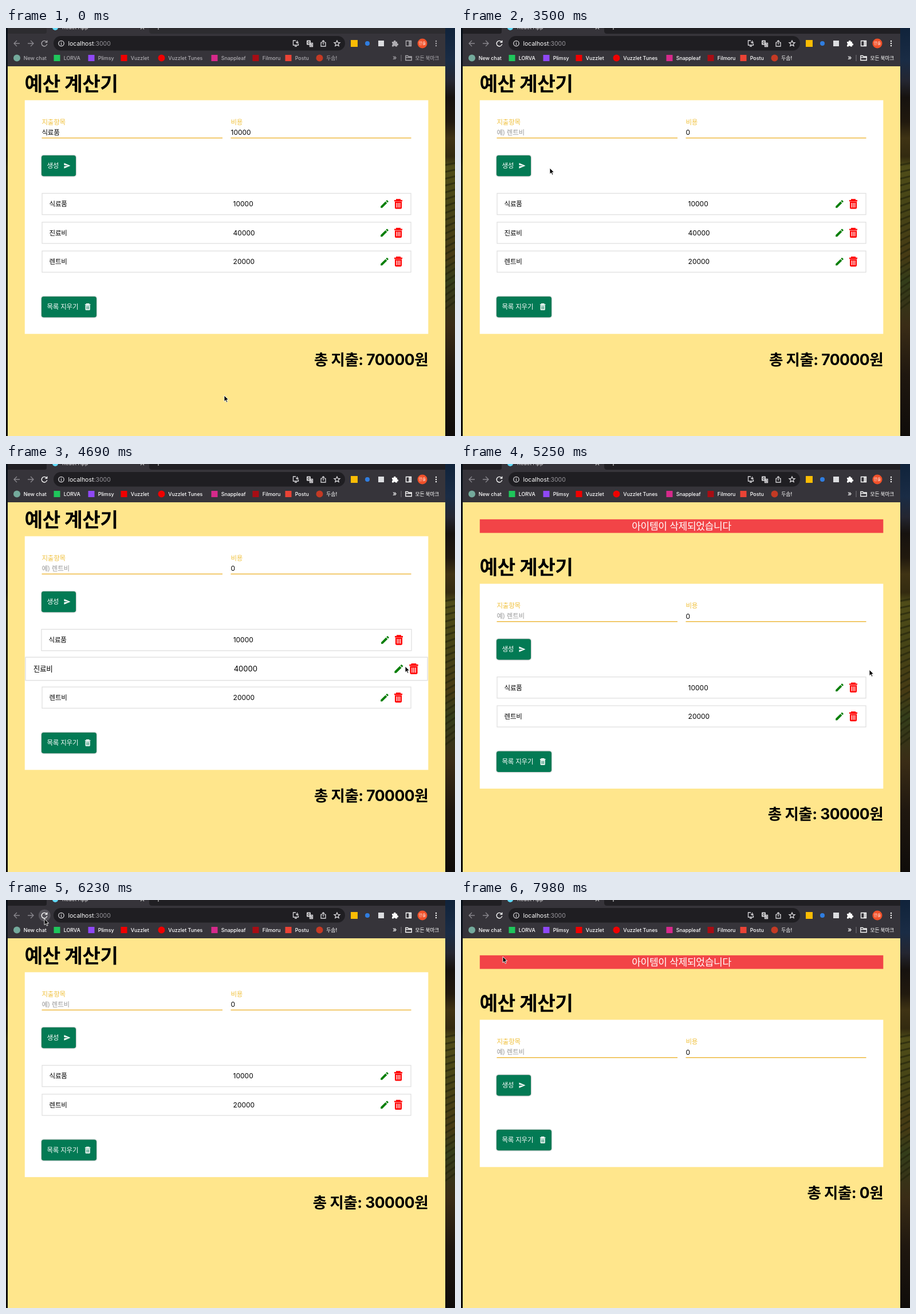
Write an HTML page that moves like this. It is 784 px wide and 714 px high and loops after 8 s.

```html
<!DOCTYPE html>
<html lang="ko">
<head>
<meta charset="utf-8">
<title>예산 계산기</title>
<style>
  html, body { margin: 0; width: 100%; height: 100%; overflow: hidden; background: #111; }
  svg { display: block; width: 784px; height: 714px; font: 12px Inter, "Noto Sans CJK KR", sans-serif; }
  text { white-space: pre; }
  .ko { letter-spacing: -.02em; }
  .bold { font-weight: 700; }
  .label { fill: #f0c03c; }
  .btn { filter: drop-shadow(.75px .75px 1.1px rgba(0, 0, 0, .5)); }
  .btn text, .btn path { fill: #fff; }
  #tabs { fill: #201f23; }
  #tools { color: #fff; font-size: 8.9px; font-weight: 500; }
  #tools text { fill: currentColor; }
  .idle #tabs { fill: #2d2c30; }
  .idle #tools { color: #aeacb1; }
  .line { fill: none; stroke: currentColor; stroke-width: 1.3; }
</style>
</head>
<body>
<svg id="stage" viewBox="0 0 784 714"></svg>
<script>
const LOOP = 8000, STEP = 70, PITCH = 50.4, ALERT_SHIFT = 83.2;
const FOCUSED = 1400, HOVER_TIME = 300;

const states = [
  { since: 0, items: [0, 1, 2], filled: true },
  { since: 1700, items: [0, 1, 2] },
  { since: 5110, items: [0, 2], alert: true },
  { since: 6140, items: [0, 2] },
  { since: 7490, items: [], alert: true },
];
const expenses = [['식료품', 10000], ['진료비', 40000], ['렌트비', 20000]];

// time, x, y of the pointer tip
const path = [
  [0, 381, 643], [70, 375, 630], [280, 195, 300], [490, 42, 27], [630, 76, 56], [840, 76, 56],
  [1050, 86, 35], [1120, 86, 35], [1260, 71, 30], [2240, 71, 30], [2800, 146, 186],
  [3080, 146, 186], [3500, 155, 245], [3600, 200, 289], [3690, 290, 340], [3920, 600, 352],
  [4000, 662, 327], [4150, 686, 313], [4330, 692, 318], [4400, 695, 329], [4415, 695, 339],
  [4690, 697, 354], [4970, 713, 360], [5250, 713, 360], [5810, 67, 33], [6510, 67, 33],
  [6720, 140, 205], [6930, 140, 205], [7300, 125, 430], [7600, 120, 428], [7980, 73, 99],
];

const $ = id => document.getElementById(id);
const within = (t, a, b) => t >= a && t < b;

// Text placed by its left edge and vertical centre
const text = (x, y, str, size = 11.5, attrs = 'class="ko"') =>
  `<text x="${x}" y="${y + size * .365}" font-size="${size}" ${attrs}>${str}</text>`;
const rect = (x, y, w, h, fill, attrs = '') =>
  `<rect x="${x}" y="${y}" width="${w}" height="${h}" fill="${fill}" ${attrs}/>`;
const dot = (x, y, r, fill) => `<circle cx="${x}" cy="${y}" r="${r}" fill="${fill}"/>`;
const icon = (x, y, d) => `<path class="line" transform="translate(${x} ${y})" d="${d}"/>`;
const trash = (x, y, scale, fill, gap) => `<g transform="translate(${x} ${y}) scale(${scale})">
  <path d="M-7-7H-4V-8.7H4V-7H7V-4.6H-7ZM-6-4H6V6.8Q6 8.6 4.2 8.6H-4.2Q-6 8.6-6 6.8Z" style="fill:${fill}"/>
  <path d="M-2.8-2V6.2M0-2V6.2M2.8-2V6.2" stroke="${gap}" stroke-width="1.3"/></g>`;

function wallpaper() {
  const stops = [[0, '#10233b'], [.08, '#1a2c45'], [.13, '#242631'], [.17, '#16120f'], [.23, '#21190e'],
    [.27, '#3f3314'], [.315, '#332a10'], [.34, '#4f4c18'], [.44, '#464416'],
    [.56, '#463a14'], [.62, '#333d1a'], [.73, '#3a2c16'], [.85, '#1f170f'], [1, '#0f0c0a']];
  const rows = Array.from({ length: 22 }, (_, i) => `M766 ${240 + i * 12}l20 ${-4 - i / 2}`).join('');
  return `<linearGradient id="sky" x2="0" y2="1">${
    stops.map(([o, c]) => `<stop offset="${o}" stop-color="${c}"/>`).join('')}</linearGradient>
    ${rect(0, 0, 784, 714, 'url(#sky)')}
    <path d="${rows}" stroke="#22230c" stroke-width="3" opacity=".6"/>
    ${rect(0, 0, 3, 714, '#000', 'opacity=".6"')}`;
}

function browser() {
  const bookmarks = [
    [19, 'New chat', '#74aa9c'], [89, 'LORVA', '#1fc65b', 1], [149, 'Plimsy', '#8f48f5', 1],
    [206, 'Vuzzlet', '#f00000', 1], [271.5, 'Vuzzlet Tunes', '#f00000'], [364, 'Snappleaf', '#d62a8b', 1],
    [436, 'Filmoru', '#a80d14', 1], [493, 'Postu', '#ea4335', 1], [547.5, '두솜!', '#c43a24'],
  ].map(([x, name, fill, square]) =>
    (square ? rect(x - 5.5, 47, 11, 11, fill) : dot(x, 52.5, 6, fill)) +
    text(x + 11.7, 52.5, name, 8.9, '')).join('');
  return `${rect(3, 0, 764, 67, '#36343a')}
    <path id="tabs" d="M3 0H71V7Q71 10 67 10H3ZM250 0H767V10H255Q250 10 250 5Z"/>
    ${dot(86, -1, 5, '#61dafb')}
    ${text(98, -1, 'React App', 9.4, 'fill="#dedde0"')}
    <path d="M235-4l6 6m0-6l-6 6M266-3V3" stroke="#ccc" stroke-width="1.2"/>
    ${rect(83, 14, 509, 25.5, '#1f1e22', 'rx="12.7"')}
    <g color="#89878d">${icon(19, 27, 'M5 0H-5M0-5L-5 0 0 5')}${icon(43, 27, 'M-5 0H5M0-5L5 0 0 5')}</g>
    <circle id="reloadHover" cx="67.3" cy="27" r="10.5" fill="#56545b"/>
    <g color="#d8d7da">
      ${icon(96.5, 27, 'M-4.7 0a4.7 4.7 0 1 0 9.4 0a4.7 4.7 0 1 0-9.4 0M0-.8V2.7M0-2.8V-1.7')}
      <g id="install">${icon(506, 27, 'M0-5H-4.5V3H4.5V0M-2 5H2M2.5-5V-.5M.3-2.5L2.5-.3 4.7-2.5')}</g>
      <g id="translate">${rect(525, 21.5, 7, 8, '#d8d7da', 'rx="1"')}
        ${text(526.5, 25.5, 'G', 6, 'fill="#222" class="bold"')}
        ${icon(532.5, 29, 'M-2-2.5H3V3.5H-2ZM-1-.5H2M.5-1V0M1.5 0L-.8 2.3M-.3 0L2 2.3')}</g>
      ${icon(554, 27, 'M-2-1.5H-4V5H4V-1.5H2M0 2V-5M-2.3-3L0-5.2 2.3-3')}
      ${icon(578, 27, 'M0-5L1.5-1.7 5-1.4 2.3 .9 3.1 4.5 0 2.6-3.1 4.5-2.3 .9-5-1.4-1.5-1.7Z')}
    </g>
    ${text(108.5, 27, 'localhost<tspan fill="#99979d">:3000</tspan>', 10.5, 'fill="#fff"')}
    ${rect(602, 21, 12, 12, '#fbbc04')}${dot(631, 27, 4, '#2f7de0')}${rect(650, 22, 10, 10, '#dcdde0')}
    ${dot(727, 27, 8.5, '#f0512a')}
    ${text(721, 27, '민솔', 6.6, 'class="ko" fill="#fff"')}
    <g id="tools">
      ${icon(67, 27, 'M4 -2.5A4.8 4.8 0 1 0 4.7 1.2M4.7-5.3V-1.8H1.2')}
      <path transform="translate(679 27)" fill="currentColor" d="M-5-3H-2A1.8 1.8 0 1 1 1.5-3H4V0A1.7 1.7 0 1 1 4 3.3V5.5H1A1.7 1.7 0 0 0-2.3 5.5H-5V2.7A1.7 1.7 0 0 0-5-.5Z"/>
      ${icon(703, 27, 'M-4.5-4.5H4.5V4.5H-4.5ZM1-4.5H4.5V4.5H1ZM2.7-4V4')}
      ${[-4, 0, 4].map(d => dot(751, 27 + d, 1.2, 'currentColor')).join('')}
      ${bookmarks}
      ${text(675, 52, '»', 12, '')}
      <path d="M690 47V58" stroke="#77757b"/>
      ${icon(703, 52.5, 'M-5.2-4H-1.5L0-2.5H5.2V4H-5.2ZM-5-.8H5')}
      ${text(714.5, 52.5, '모든 북마크', 8.8)}
    </g>`;
}

const button = (id, y, w, label, glyph) => `<g class="btn" id="${id}">
  ${rect(62, y, w, 36.2, '#037a54', 'rx="3.8"')}${text(71.5, y + 18, label)}${glyph}</g>`;

const row = i => `<g id="row${i}">
  ${rect(-322, -18.6, 644, 37.2, '#fff', 'stroke="#e0e0e0" stroke-width="1.3"')}
  <text class="ko" id="name${i}" x="-309.4" y="4.3" font-size="11.5"></text>
  <text id="cost${i}" x="11.6" y="4.4"></text>
  <path transform="translate(266.9 -9.1) scale(.756)" fill="#087f08" d="M3 17.25V21h3.75L17.81 9.94l-3.75-3.75L3 17.25zM20.71 7.04a1 1 0 0 0 0-1.41l-2.34-2.34a1 1 0 0 0-1.41 0l-1.83 1.83 3.75 3.75 1.83-1.83z"/>
  ${trash(300, 0, 1, '#f00', '#fff')}</g>`;

function page() {
  return `${rect(3, 67, 764, 647, '#ffe68c')}
    <g id="alert">${rect(32.8, 96.8, 704.5, 23.8, '#f24447')}
      ${text(385, 108.6, '아이템이 삭제되었습니다', 17.1, 'class="ko" fill="#fff" text-anchor="middle"')}</g>
    <g id="content">
      ${text(32.5, 97.5, '예산 계산기', 34.5, 'class="ko bold"')}
      <rect id="card" x="32.8" y="126.4" width="704.5" fill="#fff"/>
      ${text(62.5, 165, '지출항목', 11.5, 'class="ko label"')}${text(392.5, 165, '비용', 11.5, 'class="ko label"')}
      ${text(62.5, 183, '', 11.5, 'class="ko" id="charge"')}${text(392.5, 183, '', 12, 'id="amount"')}
      <path d="M62.5 192.5H378M392.5 192.5H707.5" stroke="#edb93f" stroke-width="1.5"/>
      ${button('create', 223, 60, '생성', '<path transform="translate(100.4 234.6) scale(.53)" d="M2 21L23 12 2 3V10l15 2-15 2z"/>')}
      <g id="footer">
        ${button('clear', 470, 96, '목록 지우기', trash(142.7, 488, .68, '#fff', '#037a54'))}
        ${text(737, 580, '', 26.5, 'class="ko bold" id="total" text-anchor="end"')}
      </g>
      ${row(0)}${row(1)}${row(2)}
    </g>`;
}

const stateAt = t => states.findLast(s => s.since <= t) ?? states[0];
const missingHeight = state => (state.items.length - 3) * PITCH;

// Smooth curve through the path that halts at repeated points
function pointerAt(t) {
  const i = path.findIndex(p => p[0] > t) - 1;
  if (i < 0) return path.at(-1).slice(1);
  const [a, b] = [path[i], path[i + 1]];
  const span = b[0] - a[0], u = (t - a[0]) / span;
  const rests = (p, q) => !p || !q || (p[1] === q[1] && p[2] === q[2]);
  const speed = (k, axis) => {
    const [p, c, q] = [path[k - 1], path[k], path[k + 1]];
    return rests(p, c) || rests(c, q) ? 0 : (q[axis] - p[axis]) / (q[0] - p[0]);
  };
  return [1, 2].map(axis => {
    const d = b[axis] - a[axis], va = speed(i, axis) * span, vb = speed(i + 1, axis) * span;
    return a[axis] + u * (va + u * (3 * d - 2 * va - vb + u * (va + vb - 2 * d)));
  });
}

// Linear hover transition, 0 to 1, replayed up to time t
function hoverAmount(t, from, isOver) {
  const step = 10;
  let amount = 0;
  for (let s = Math.max(FOCUSED, from, t - 1500); s < t; s += step) {
    const { alert } = stateAt(s), [x, y] = pointerAt(s);
    const over = isOver(x, y - (alert ? ALERT_SHIFT : 0), amount, s);
    amount = Math.min(1, Math.max(0, amount + (over ? step : -step) / HOVER_TIME));
  }
  return amount;
}

const rowScale = (i, t, since) => 1 + .1 * hoverAmount(t, since, (x, y, amount) => {
  const scale = 1 + .1 * amount;
  return Math.abs(x - 385) < 322.5 * scale && Math.abs(y - 308 - i * PITCH) < 19 * scale;
});

const clearHover = t => hoverAmount(t, 0, (x, y, _, s) => {
  const top = 470 + missingHeight(stateAt(s));
  return within(x, 62, 158) && within(y, top, top + 36);
});

const show = (id, on) => $(id).setAttribute('visibility', on ? 'visible' : 'hidden');
const move = (id, x, y, scale = 1) =>
  $(id).setAttribute('transform', `translate(${x} ${y}) scale(${scale})`);

function draw(t) {
  const state = stateAt(t), { since, items, filled, alert } = state;
  const missing = missingHeight(state);
  const loading = within(t, 1470, 1820) || within(t, 5880, 6220);

  $('stage').classList.toggle('idle', t < FOCUSED);
  show('reloadHover', within(t, 1260, 2310) || within(t, 5810, 6580));
  show('translate', !loading);
  move('install', loading ? 24 : 0, 0);

  show('alert', alert);
  move('content', 0, alert ? ALERT_SHIFT : 0);
  $('charge').textContent = filled ? '식료품' : '예) 렌트비';
  $('charge').setAttribute('fill', filled ? '#000' : '#999');
  $('amount').textContent = filled ? 10000 : 0;
  $('card').setAttribute('height', 408.9 + missing);
  move('footer', 0, missing);
  const lift = clearHover(t);
  $('clear').style.filter =
    `drop-shadow(${.75 + .75 * lift}px ${.75 + 3 * lift}px 1.1px rgba(0, 0, 0, .5))`;
  $('total').textContent = `총 지출: ${items.reduce((sum, i) => sum + expenses[i][1], 0)}원`;

  for (let i = 0; i < 3; i++) {
    show('row' + i, i < items.length);
    if (i >= items.length) continue;
    [$('name' + i).textContent, $('cost' + i).textContent] = expenses[items[i]];
    move('row' + i, 385, 308 + i * PITCH, rowScale(i, t, since));
  }
  move('pointer', ...pointerAt(t));
}

$('stage').innerHTML = wallpaper() + browser() + page() +
  `<path id="pointer" d="M0 0V10.6L2.5 8.4 4.2 12.2 6 11.4 4.3 7.7H7.6Z" fill="#000" stroke="#fff" stroke-width=".9"/>`;

const start = performance.now();
function tick() {
  const t = (performance.now() - start) % LOOP;
  draw(Math.floor(t / STEP) * STEP);
  requestAnimationFrame(tick);
}
tick();
</script>
</body>
</html>
```
